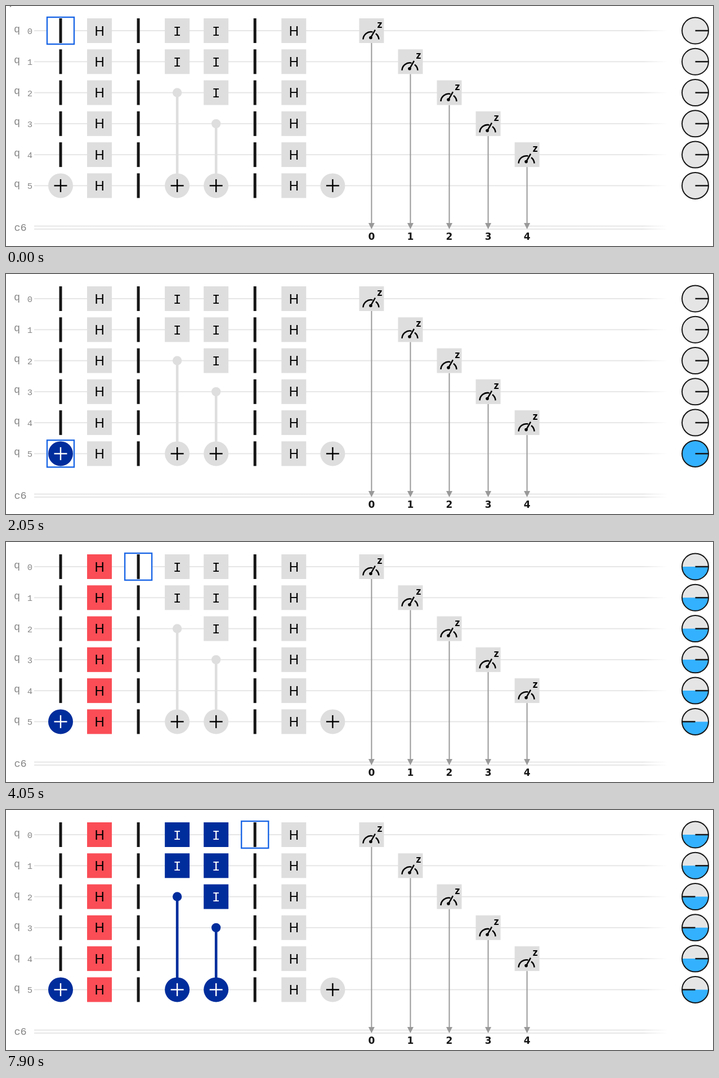
Recreate the animation shown at these times as an HTML page. Size 1256 by 428 pixels, loop 8 s.

```html
<!DOCTYPE html>
<html lang="en">
<head>
<meta charset="utf-8">
<title>Circuit inspector</title>
<style>
html, body { margin: 0; width: 100%; height: 100%; overflow: hidden; background: #fff; }
svg { display: block; width: 100%; height: 100%; }
text { text-anchor: middle; }
.label { font-family: "Liberation Mono", monospace; fill: #868686; }
.gate { font: 24px "Liberation Sans", sans-serif; }
.mono { font: 24px "Liberation Mono", monospace; }
.axis { font: bold 18px "Open Sans", sans-serif; }
.bit { font: bold 17px "DejaVu Sans", sans-serif; fill: #161616; }
</style>
</head>
<body>
<svg id="stage" viewBox="0 0 1256 428"></svg>
<script>
const INK = '#161616', GREY = '#dedede', BLUE = '#002d9c', RED = '#fa4d56', SKY = '#33b1ff';
const LOOP = 8000;
const stage = document.getElementById('stage');
const rows = [0, 1, 2, 3, 4, 5];
const X = col => 97 + 69.05 * col;
const Y = row => 44 + 55.28 * row;

const line = (x1, y1, x2, y2, color, width) =>
  `<path d="M${x1} ${y1}L${x2} ${y2}" stroke="${color}" stroke-width="${width}"/>`;
const rect = (x, y, w, h, fill) =>
  `<rect x="${x}" y="${y}" width="${w}" height="${h}" fill="${fill}"/>`;
const circle = (x, y, r, fill, extra = '') =>
  `<circle cx="${x}" cy="${y}" r="${r}" fill="${fill}" ${extra}/>`;
const text = (x, y, str, cls, extra = '') =>
  `<text x="${x}" y="${y}" class="${cls}" ${extra}>${str}</text>`;
const box = (col, row, fill) => rect(X(col) - 22, Y(row) - 22, 44, 44, fill);
const ink = fill => fill === BLUE ? '#fff' : '#000';

const gate = (name, col, row, fill) => box(col, row, fill) +
  text(X(col), Y(row) + 8.5, name, name === 'I' ? 'mono' : 'gate', `fill="${ink(fill)}"`);

function not(col, row, fill) {
  const x = X(col), y = Y(row), c = ink(fill);
  return circle(x, y, 22, fill) + line(x - 11.5, y, x + 11.5, y, c, 2.4) +
    line(x, y - 11.5, x, y + 11.5, c, 2.4);
}

const cnot = (col, control, fill) =>
  line(X(col), Y(control), X(col), Y(5), fill, 4.6) +
  circle(X(col), Y(control), 8.2, fill) + not(col, 5, fill);

const barrier = (col, count) => rows.slice(0, count)
  .map(row => rect(X(col) - 2.5, Y(row) - 22, 5, 44, INK)).join('');

const frame = (col, row) =>
  `<rect x="${X(col) - 24}" y="${Y(row) - 24}" width="48" height="48" fill="#fff" stroke="#1a66e6" stroke-width="2.4"/>`;

function meter(bit) {
  const x = X(bit + 8), y = Y(bit);
  return line(x, y + 22, x, 390, '#999', 2) +
    `<path d="M${x - 5.5} 387h11l-5.5 11z" fill="#999"/>` + box(bit + 8, bit, GREY) +
    `<g transform="translate(${x} ${y})" fill="none" stroke="#000" stroke-width="2.5">
      <path d="M-15 15.5A14 14 0 0 1 2 2.4M7.5 5.2A14 14 0 0 1 13 15.5M-1.5 12.5L6.5 -1.5"/></g>` +
    circle(x - 1.5, y + 12.5, 2.8, '#000') +
    text(x + 14.5, y - 5, 'z', 'axis') + text(x, 417, bit, 'bit');
}

// level: share of blue, 0, 0.5 or 1; side: direction of the phase hand
function disc(row, level, side) {
  const x = 1224.5, y = Y(row);
  const half = level === 0.5 ? `<path d="M${x - 23.5} ${y}a23.5 23.5 0 0 0 47 0z" fill="${SKY}"/>` : '';
  return circle(x, y, 23.5, level === 1 ? SKY : '#e5e5e5') + half +
    circle(x, y, 23.5, 'none', `stroke="${INK}" stroke-width="2"`) +
    line(x, y, x + 23 * side, y, INK, 2.5);
}

const wires = rows.map(row =>
  rect(50, Y(row) - 1, 1126, 2, 'url(#fade)') +
  text(19.5, Y(row) + 2.5, 'q', 'label', 'font-size="18.5"') +
  text(42.5, Y(row) + 6, row, 'label', 'font-size="15.5"')).join('') +
  rect(50, 391.5, 1126, 2, 'url(#fade)') + rect(50, 396.8, 1126, 2, 'url(#fade)') +
  text(25.5, 400.5, 'c6', 'label', 'font-size="18.5"');

const defs = `<defs><linearGradient id="fade" gradientUnits="userSpaceOnUse" x1="50" x2="1176">
  <stop offset="0" stop-color="#e6e6e6"/><stop offset=".96" stop-color="#e6e6e6"/>
  <stop offset="1" stop-color="#fff"/></linearGradient></defs>`;

const meters = [0, 1, 2, 3, 4].map(meter).join('');

// step: number of inspected layers; [col, row] is the selected cell
function draw(step, [col, row], mark) {
  const first = step > 0 ? BLUE : GREY;
  const second = step > 1 ? RED : GREY;
  const third = step > 2 ? BLUE : GREY;
  const level = r => step > 1 ? 0.5 : step === 1 && r === 5 ? 1 : 0;
  const flipped = [[], [], [5], [2, 3, 5]][step];
  stage.innerHTML = defs + wires + frame(col, row) +
    barrier(0, 5) + barrier(2, 6) + barrier(5, 6) + not(0, 5, first) +
    rows.map(r => gate('H', 1, r, second) + gate('H', 6, r, GREY)).join('') +
    [0, 1].map(r => gate('I', 3, r, third)).join('') +
    [0, 1, 2].map(r => gate('I', 4, r, third)).join('') +
    cnot(3, 2, third) + cnot(4, 3, third) + not(7, 5, GREY) + meters +
    rows.map(r => disc(r, level(r), flipped.includes(r) ? -1 : 1)).join('') +
    (mark ? line(9, 0, 7, 1.5, '#777', 1.5) : '');
}

const scenes = [
  [0, 0, [0, 0], true],
  [1700, 1, [0, 0], true],
  [1750, 1, [0, 5], false],
  [4050, 2, [2, 0], false],
  [6100, 3, [5, 0], false]
];
let shown;
function tick(now) {
  const scene = scenes.findLast(s => s[0] <= now % LOOP);
  if (scene !== shown) {
    shown = scene;
    draw(...scene.slice(1));
  }
  requestAnimationFrame(tick);
}
tick(performance.now());
</script>
</body>
</html>
```
